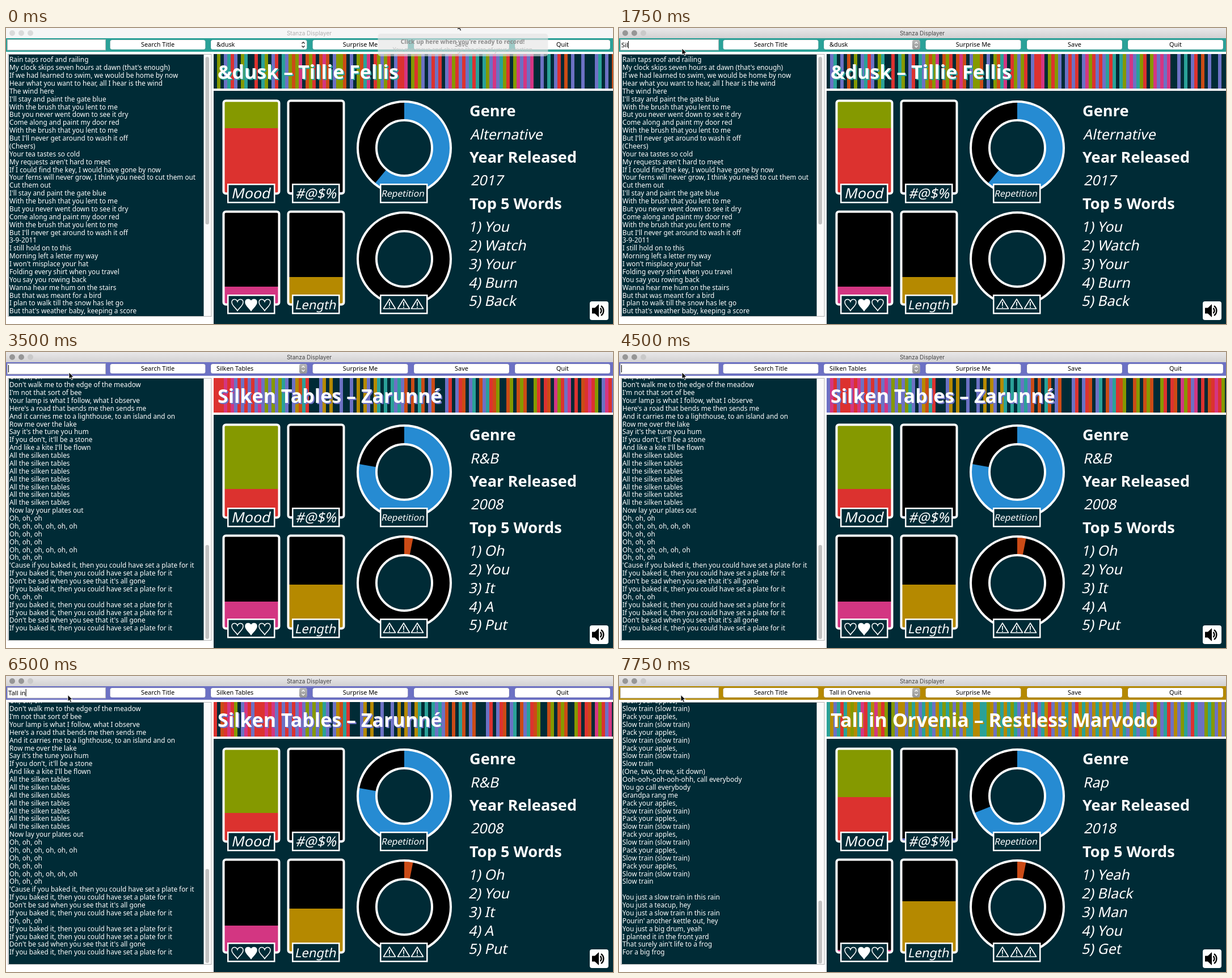
Animation, 1070 px wide and 523 px high, one loop 8 s. Source, as an HTML page:

```html
<!DOCTYPE html>
<html lang="en">
<head>
<meta charset="utf-8">
<title>Stanza Displayer</title>
<style>
  html, body { margin: 0; width: 100%; height: 100%; overflow: hidden; background: #fff; }
  svg { display: block; width: 1070px; height: 523px; }
  text { font-family: "Noto Sans", "Open Sans", sans-serif; white-space: pre; }
  .ui { font-size: 10.9px; font-weight: 500; fill: #000; }
  .mid { text-anchor: middle; }
  .lyric { font-size: 11.8px; font-weight: 500; fill: #fff; }
  .head { font-size: 27.2px; font-weight: 700; fill: #fff; }
  .big { font-size: 34px; font-weight: 700; }
</style>
</head>
<body>
<svg id="stage" viewBox="0 0 1070 523" xmlns="http://www.w3.org/2000/svg"></svg>
<script>
const LOOP = 8000, STEP = 250, STRIPE = 6, COUNT = 118;
const INK = '#002b36';
const HUE = { k: INK, y: '#b58900', o: '#cb4b16', r: '#dc322f', m: '#d33682',
              v: '#6c71c4', b: '#268bd2', c: '#2aa198', g: '#859900' };

const brush = 'With the brush that you lent to me';
const gate = ["I'll stay and paint the gate blue", brush, 'But you never went down to see it dry',
  'Come along and paint my door red', brush, "But I'll never get around to wash it off"];
const oh = 'Oh, oh, oh', ohs = oh + ', oh, oh, oh';
const plate = 'If you baked it, then you could have set a plate for it';
const gone = "Don't be sad when you see that it's all gone";
const pair = ['Pack your apples,', 'Slow train (slow train)'];
const repeat = (n, ...lines) => Array(n).fill(lines).flat();

// Zones give the stripe colours from left to right: how many, and which to pick from.
const SONGS = [
  {
    title: '&dusk', artist: 'Tillie Fellis', accent: HUE.c, genre: 'Alternative', year: 2017,
    words: ['You', 'Watch', 'Your', 'Burn', 'Back'],
    mood: 177, swear: 290, love: 457, length: 440, rep: 0.61, warn: 0,
    top: 60.3, thumb: [51, 347], seed: 11,
    zones: [[22, 'kkkvkcgrv'], [24, 'grgvcgmko'], [22, 'rvmgkgrv'], [26, 'gkvgrgmc'], [24, 'kkkkkvocr']],
    lines: ['Rain taps roof and railing', "My clock skips seven hours at dawn (that's enough)",
      'If we had learned to swim, we would be home by now',
      'Hear what you want to hear, all I hear is the wind', 'The wind here', ...gate, '(Cheers)',
      'Your tea tastes so cold', "My requests aren't hard to meet",
      'If I could find the key, I would have gone by now',
      'Your ferns will never grow, I think you need to cut them out', 'Cut them out', ...gate,
      '3-9-2011', 'I still hold on to this', 'Morning left a letter my way',
      "I won't misplace your hat", 'Folding every shirt when you travel', 'You say you rowing back',
      'Wanna hear me hum on the stairs', 'But that was meant for a bird',
      'I plan to walk till the snow has let go', "But that's weather baby, keeping a score"]
  },
  {
    title: 'Silken Tables', artist: 'Zarunné', accent: HUE.v, genre: 'R&B', year: 2008,
    words: ['Oh', 'You', 'It', 'A', 'Put'],
    mood: 242, swear: 290, love: 441, length: 411, rep: 0.778, warn: 0.031,
    top: 48.3, thumb: [341, 507], seed: 29,
    zones: [[17, 'rvrmgrv'], [12, 'grvkcoy'], [27, 'kkvcykk'], [13, 'kvockk'], [20, 'kkcovgkr'], [29, 'krmvrogk']],
    lines: [oh, "Don't walk me to the edge of the meadow", "I'm not that sort of bee",
      'Your lamp is what I follow, what I observe', "Here's a road that bends me then sends me",
      'And it carries me to a lighthouse, to an island and on', 'Row me over the lake',
      "Say it's the tune you hum", "If you don't, it'll be a stone", "And like a kite I'll be flown",
      ...repeat(7, 'All the silken tables'), 'Now lay your plates out',
      oh, ohs, oh, oh, ohs, oh,
      "'Cause if you baked it, then you could have set a plate for it",
      plate, gone, plate, oh, plate, plate, gone, plate]
  },
  {
    title: 'Tall in Orvenia', artist: 'Restless Marvodo', accent: HUE.y, genre: 'Rap', year: 2018,
    words: ['Yeah', 'Black', 'Man', 'You', 'Get'],
    mood: 214, swear: 287, love: 484, length: 398, rep: 0.69, warn: 0.031,
    top: 48.3, thumb: [397, 508], seed: 53,
    zones: [[20, 'yyrmcvgk'], [35, 'ycvcyg'], [35, 'yycvvyr'], [28, 'ccvvvygr']],
    lines: [...repeat(4, ...pair), 'Slow train', '(One, two, three, sit down)',
      'Ooh-ooh-ooh-ooh-ohh, call everybody', 'You go call everybody', 'Grandpa rang me',
      ...repeat(5, ...pair), 'Slow train', '',
      'You just a slow train in this rain', 'You just a teacup, hey',
      'You just a slow train in this rain', "Pourin' another kettle out, hey",
      'You just a big drum, yeah', 'I planted it in the front yard',
      "That surely ain't life to a frog", 'For a big frog']
  }
];

const esc = s => String(s).replace(/&/g, '&amp;');
const rect = (x, y, w, h, fill, more = '') =>
  `<rect x="${x}" y="${y}" width="${w}" height="${h}" fill="${fill}" ${more}/>`;
const text = (x, y, s, cls, more = '') => `<text x="${x}" y="${y}" class="${cls}" ${more}>${esc(s)}</text>`;
const slant = (x, y, s, size, anchor = 'start') =>
  `<text transform="translate(${x} ${y}) skewX(-12)" font-size="${size}" fill="#fff" text-anchor="${anchor}">${esc(s)}</text>`;

function stripes(song) {
  let seed = song.seed, last = '';
  const rand = () => (seed = seed * 16807 % 2147483647) / 2147483647;
  for (let i = 0; i < 9; i++) rand();
  const pick = letters => letters[Math.floor(rand() * letters.length)];
  const row = [];
  for (const [n, letters] of song.zones) {
    for (let i = 0; i < n; i++) {
      let c = pick(letters);
      if (c === last) c = pick(letters); // repeats are rare
      last = c;
      row.push(HUE[c]);
    }
  }
  return [...row, ...row].map((c, i) =>
    rect(366 + (i - COUNT) * STRIPE, 46, STRIPE, 61, c, 'shape-rendering="crispEdges"')).join('');
}

// Two-colour tank: base colour with a fill rising from the bottom.
function tank(x, y, base, level, fill) {
  return rect(x + 1.5, y + 1.5, 98, 164, base, 'rx="3"') +
    rect(x + 3, level, 95.5, Math.max(0, y + 164 - level), fill) +
    rect(x + 1.5, y + 1.5, 98, 164, 'none', 'rx="4" stroke="#fff" stroke-width="4"');
}

function ring(cy, part, color) {
  const arc = part ? `<circle r="65.5" fill="none" stroke="${color}" stroke-width="33" pathLength="1"
    stroke-dasharray="${part} 2" transform="rotate(-90)"/>` : '';
  return `<g transform="translate(702 ${cy})"><circle r="65.5" fill="none" stroke="#000" stroke-width="33"/>${arc}
    <g fill="none" stroke="#fff" stroke-width="4"><circle r="82"/><circle r="49"/></g></g>`;
}

const tag = (x, y) => rect(x + 1.25, y + 1.25, 82, 32, INK, 'stroke="#fff" stroke-width="2.5"');

const heart = (x, fill) => `<path transform="translate(${x} 489.5)" fill="${fill}" stroke="#fff" stroke-width="1.5"
  d="M0 10C-3 5-10 1-10-5C-10-11-2-12 0-6C2-12 10-11 10-5C10 1 3 5 0 10Z"/>`;
const alarm = x => `<path transform="translate(${x} 488)" fill="none" stroke="#fff" stroke-width="1.7"
  stroke-linejoin="round" d="M0-9L10.5 8H-10.5ZM0-4V3M0 4.6V6.4"/>`;

const tags = tag(390, 275) + tag(504, 275) + tag(659, 275) + tag(390, 471) + tag(504, 471) + tag(659, 471) +
  slant(431, 301, 'Mood', 25, 'middle') + slant(546, 301, '#@$%', 24.4, 'middle') +
  slant(699, 298, 'Repetition', 15.7, 'middle') + slant(545, 497, 'Length', 22, 'middle') +
  heart(408, 'none') + heart(432, '#fff') + heart(456, 'none') + [676, 701, 725].map(alarm).join('');

function songView(song, i) {
  const name = `${song.title} – ${song.artist}`;
  const [a, b] = song.thumb;
  return `<g id="song${i}" display="none">
    ${rect(0, 18, 1070, 24, song.accent)}
    <g clip-path="url(#banner)"><g id="stripes${i}">${stripes(song)}</g>
      ${text(375, 92, name, 'big', `fill="${song.accent}"`)}${text(373, 90, name, 'big', 'fill="#fff"')}</g>
    <g clip-path="url(#page)">
      ${song.lines.map((s, n) => text(6, song.top + n * 13.875, s, 'lyric')).join('')}</g>
    ${rect(351.5, a, 6.5, b - a, '#c1c1c1', 'rx="3.2"')}
    ${tank(382, 127, HUE.g, song.mood, HUE.r)}
    ${tank(496, 127, '#000', song.swear, HUE.v)}
    ${tank(382, 323, '#000', song.love, HUE.m)}
    ${tank(496, 323, '#000', song.length, HUE.y)}
    ${ring(212, song.rep, HUE.b)}${ring(408, song.warn, HUE.o)}
    ${tags}
    ${slant(818, 197, song.genre, 25)}${slant(819, 278, song.year, 25)}
    ${song.words.map((w, n) => slant(815, 360.4 + n * 32.7, `${n + 1}) ${w}`, 25)).join('')}
  </g>`;
}

const button = (x, w, label) => rect(x, 21, w, 17, '#fff', 'rx="3.5" stroke="#000" stroke-opacity=".12"') +
  (label ? text(x + w / 2, 33, label, 'ui mid') : '');
const chevrons = color => `<path d="M521.5 27.5L524 25L526.5 27.5M521.5 31.5L524 34L526.5 31.5"
  fill="none" stroke="${color}" stroke-width="1.3"/>`;

const stage = document.getElementById('stage');
stage.innerHTML = `
  <defs>
    <clipPath id="banner">${rect(366, 46, 704, 61, '#000')}</clipPath>
    <clipPath id="page">${rect(5, 47, 343, 462, '#000')}</clipPath>
    <linearGradient id="bar" x2="0" y2="1"><stop stop-color="#e9e8e9"/><stop offset="1" stop-color="#d2d1d2"/></linearGradient>
    <linearGradient id="knob" x2="0" y2="1"><stop stop-color="#b8b8b8"/><stop offset="1" stop-color="#969696"/></linearGradient>
  </defs>
  ${rect(0, 0, 1070, 523, '#fff')}
  ${rect(366, 111, 704, 412, INK)}
  ${rect(3.5, 46.5, 358.5, 463, '#fafafa', 'stroke="#b4b4b4"')}
  ${rect(5, 47, 343.5, 462, INK)}
  ${SONGS.map(songView).join('')}
  ${text(817, 156, 'Genre', 'head')}${text(817, 238, 'Year Released', 'head')}${text(817, 320, 'Top 5 Words', 'head')}
  ${rect(1029, 483, 33, 33, '#fff', 'rx="4"')}
  <path d="M1033 494.5H1038L1045 488V511L1038 504.5H1033Z"/>
  <path d="M1047.5 495A6 6 0 0 1 1047.5 504M1049 491A10.5 10.5 0 0 1 1049 508" fill="none" stroke="#000" stroke-width="2.4"/>
  <rect id="titlebar" width="1070" height="18"/>
  <g id="lights"><circle cx="11" cy="9" r="5"/><circle cx="27" cy="9" r="5"/></g>
  <circle id="zoom" cx="43" cy="9" r="5"/>
  <text id="caption" x="534.5" y="13" class="mid" style="font-family:Inter,sans-serif;font-size:10px">Stanza Displayer</text>
  ${rect(2.5, 20.5, 173, 18.5, '#fff', 'stroke="#b9b9b9"')}
  <text id="typed" x="4" y="33.5" font-size="11.4"></text>
  <rect id="caret" y="23" width="1" height="13"/>
  ${button(183.5, 168, 'Search Title')}${button(361, 169.5, '')}${button(540.5, 168, 'Surprise Me')}
  ${button(719, 168, 'Save')}${button(897, 168, 'Quit')}
  <text id="choice" x="371" y="33" class="ui"></text>
  <g id="idle">${chevrons('#222')}</g>
  <g id="active">${rect(517, 21, 13.5, 17, 'url(#knob)', 'rx="3.5"')}${chevrons('#fff')}</g>
  <g id="hint">
    ${rect(655.5, 10, 300, 40, '#e4e4e4', 'rx="5" fill-opacity=".62"')}
    ${text(805, 27.5, "Click up here when you're ready to record!", 'mid', 'font-size="10.4" font-weight="700" fill="#8c8c8c"')}
    ${text(805, 42, 'You can move and change the size of your selection', 'mid', 'font-size="10.2" fill="#c0c4c4"')}
  </g>
  <path id="pointer" d="M0 0V11.5L2.7 9L4.6 13.2L6.6 12.3L4.7 8.2H8.3Z" stroke="#fff" stroke-width=".9"/>`;

const $ = id => document.getElementById(id);
const set = (id, props) => { for (const p in props) $(id).setAttribute(p, props[p]); };
const show = (id, on) => set(id, { display: on ? 'inline' : 'none' });
const ease = u => u * u * (3 - 2 * u);

// Letters typed so far, by step.
function typedAt(k) {
  if (k >= 6 && k < 14) return SONGS[1].title.slice(0, [1, 3, 6, 9, 13][Math.min(k - 6, 4)]);
  if (k >= 22 && k < 28) return SONGS[2].title.slice(0, [1, 3, 4, 6, 7][Math.min(k - 22, 4)]);
  return '';
}

function pointerAt(k) {
  if (k >= 21) return [109, 33.5];
  const u = ease(Math.min(k / 5, 1));
  return [796 + (111 - 796) * u, -8 + 44 * u];
}

function draw(t) {
  const k = Math.floor(t / STEP);
  const now = k < 14 ? 0 : k < 28 ? 1 : 2;
  const shift = [Math.min(k, 10), Math.min(k, 26) - 14, k - 28][now];
  SONGS.forEach((s, i) => show('song' + i, i === now));
  set('stripes' + now, { transform: `translate(${shift * STRIPE} 0)` });
  $('choice').textContent = SONGS[now].title;

  const live = k >= 5;
  set('titlebar', { fill: live ? 'url(#bar)' : '#f6f6f6' });
  set('lights', { fill: live ? '#969696' : '#dadada' });
  set('zoom', { fill: live ? '#c9c9c9' : '#dadada' });
  set('caption', { fill: live ? '#454545' : '#b0b0b0' });
  show('active', live);
  show('idle', !live);

  const word = typedAt(k);
  $('typed').textContent = word;
  const blink = k < 14 || k % 4 !== 1;
  show('caret', live && k < 30 && (word || blink));
  set('caret', { x: 4 + (word ? $('typed').getComputedTextLength() : 0) });

  show('hint', k < 2);
  set('hint', { opacity: k ? 0.4 : 1 });
  set('pointer', { transform: `translate(${pointerAt(k)})` });
}

const start = performance.now();
function tick() {
  draw((performance.now() - start) % LOOP);
  requestAnimationFrame(tick);
}
tick();
</script>
</body>
</html>
```
